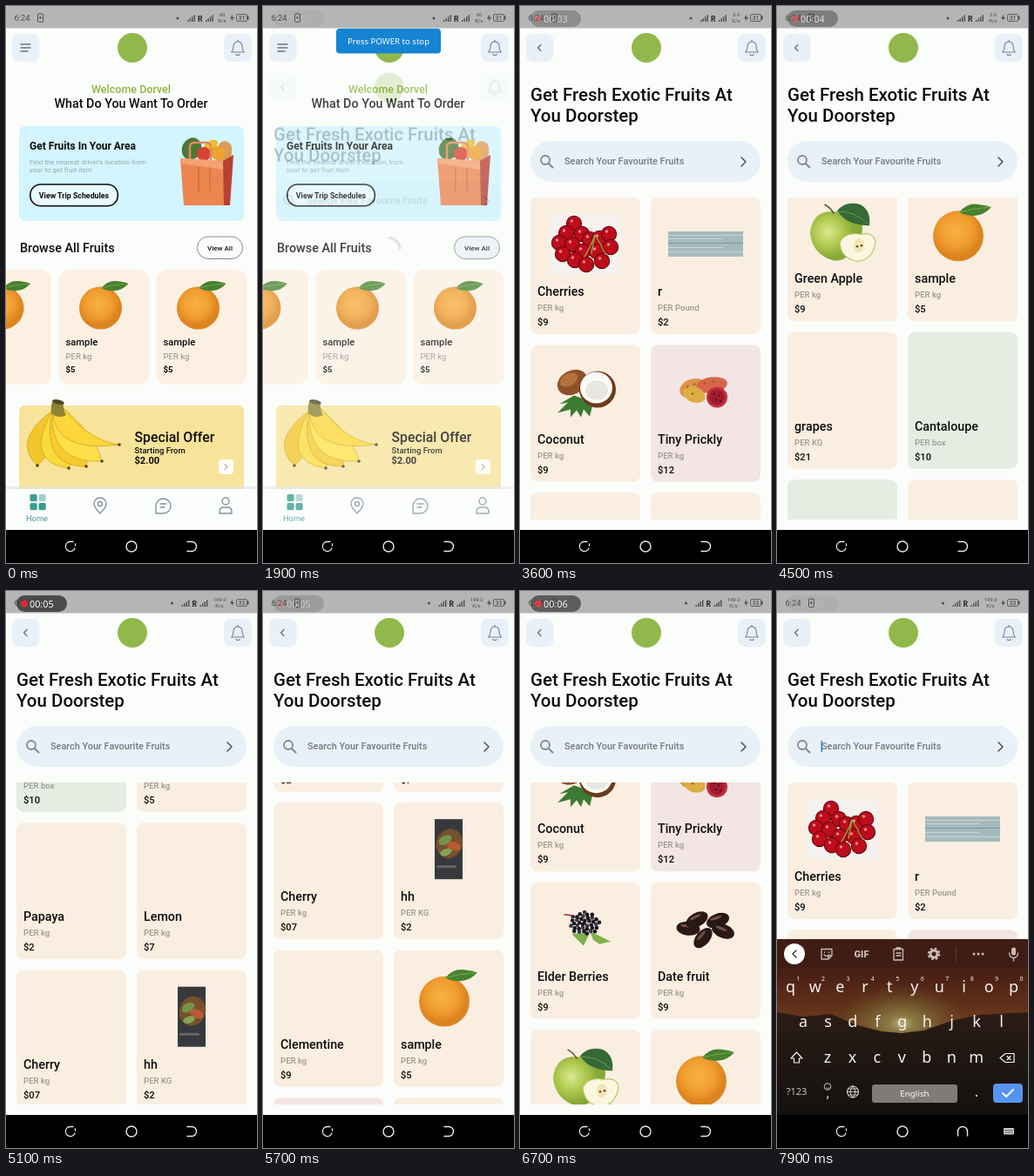
An HTML page for the animation above (8000 ms loop, 288 by 640 pixels).

```html
<!DOCTYPE html>
<html lang="en">
<head>
<meta charset="utf-8">
<title>Fruit shop</title>
<style>
html, body { margin: 0; width: 100%; height: 100%; overflow: hidden; background: #fbfdfb; }
svg { display: block; width: 100vw; height: 100vh; font-family: Roboto, sans-serif; }
.sys { font-family: "Noto Sans", sans-serif; }
</style>
</head>
<body>
<svg id="stage" viewBox="0 0 288 640" xmlns="http://www.w3.org/2000/svg"></svg>
<script>
const LOOP = 8000, BG = '#fbfdfb', ICE = '#e8f1f8', INK = '#0d0d0d';

// Markup helpers
const rect = (x, y, w, h, r, fill, more = '') =>
  `<rect x="${x}" y="${y}" width="${w}" height="${h}" rx="${r}" fill="${fill}" ${more}/>`;
const circle = (x, y, r, fill, more = '') =>
  `<circle cx="${x}" cy="${y}" r="${r}" fill="${fill}" ${more}/>`;
const oval = (x, y, rx, ry, turn, fill) =>
  `<ellipse rx="${rx}" ry="${ry}" fill="${fill}" transform="translate(${x} ${y}) rotate(${turn})"/>`;
const shape = (d, fill, more = '') => `<path d="${d}" fill="${fill}" ${more}/>`;
const line = (d, color, w = 1.4) =>
  `<path d="${d}" fill="none" stroke="${color}" stroke-width="${w}" stroke-linecap="round" stroke-linejoin="round"/>`;
const text = (x, y, s, size, weight = 500, fill = INK, more = '') =>
  `<text x="${x}" y="${y}" font-size="${size}" font-weight="${weight}" fill="${fill}" ${more}>${s}</text>`;
const mid = (x, y, s, size, weight, fill, more = '') =>
  text(x, y, s, size, weight, fill, `text-anchor="middle" ${more}`);
const group = (x, y, body, scale = 1) =>
  `<g transform="translate(${x} ${y}) scale(${scale})">${body}</g>`;
const dots = (pts, r, fill) => pts.map(([x, y]) => circle(x, y, r, fill)).join('');

// Fruit, each drawn relative to its card
const orange =
  circle(0, 0, 24.5, 'url(#orange)') +
  shape('M1-23Q8-32 18-31T32-28Q26-21 17-20T1-23Z', '#47822f') +
  line('M1-23Q14-27 30-28', '#86ad55', .7);

const cherryPts = [[50, 30], [41, 41], [59, 42], [33, 52], [68, 48], [48, 54], [79, 47], [90, 42],
  [92, 57], [37, 65], [60, 62], [51, 72], [76, 62], [64, 77], [82, 73]];
const pictures = {
  cherries: rect(21, 19, 83, 70, 0, '#f4f1ee') +
    cherryPts.map(([x, y]) => circle(x, y, 8.6, '#bd0d1b', 'stroke="#6d0711" stroke-width="1.2"') +
      circle(x - 2.5, y - 3, 1.7, '#f08a90')).join('') +
    line('M74 43Q70 55 62 68M74 43Q80 52 85 63M74 43L70 64', '#8fae3a', 1.3),
  strip: rect(20, 39, 86, 29, 0, '#a6babd') +
    [43, 47, 52, 57, 62].map((y, i) => rect(20, y, 86 - i % 2 * 24, 1, 0, i == 2 ? '#6f9cb2' : '#c9d5d4')).join(''),
  coconut: shape('M31 78L43 66L33 68L50 58L72 66L68 82L61 74L58 83L53 75L46 83L46 74Z', '#3b7a31') +
    oval(48, 43, 18, 13.5, -28, '#8f512a') + oval(44, 40, 11, 7, -28, '#b4713d') +
    circle(77, 51, 21, '#6b3c1e') + oval(75.5, 49, 18.5, 18, 0, '#fbfaf6') + oval(76, 52, 13, 11, 0, '#e8e6e0'),
  prickly: oval(49, 50, 16, 11, -15, '#e0924a') + oval(70, 46, 18, 9, -8, '#d8654a') +
    oval(50, 57, 13, 9, 20, '#dcae45') + dots([[42, 48], [50, 45], [48, 56], [62, 44], [72, 42]], 1.3, '#8b6a25') +
    oval(76, 60, 12, 12, 15, '#c0303a') + oval(76, 60, 9, 9, 15, '#a01c30') +
    dots([[73, 56], [78, 58], [75, 63], [80, 64]], 1, '#4a0a14'),
  elder: shape('M47 59L68 58L61 73ZM68 56L92 68L79 71L72 66Z', '#7fb04c') +
    line('M39 37Q52 38 60 44', '#963040', 1.5) +
    Array.from({ length: 38 }, (_, i) => {
      const a = i * 2.4, d = Math.sqrt(i / 38);
      return circle(62 + 18 * d * Math.cos(a), 47 + 13 * d * Math.sin(a), 2.3, i % 3 ? '#17151d' : '#3b3545');
    }).join(''),
  dates: [[43, 53, 5], [53, 43, -28], [77, 44, -20], [83, 56, 22], [60, 64, -50]]
    .map(([x, y, a]) => oval(x, y, 13.5, 8, a, '#2a1814') + oval(x - 2, y - 3, 7, 1.6, a, '#74524a')).join(''),
  apple: shape('M56 31Q70 23 80 33Q92 48 80 70Q66 92 49 86Q28 78 26 55Q29 28 56 31Z', 'url(#apple)') +
    line('M53 33Q50 27 43 23', '#69502d', 1.5) +
    shape('M57 30Q67 18 84 23Q96 30 94 47Q68 47 57 30Z', '#356a37') + line('M58 31Q77 30 92 45', '#83a96f', .7) +
    shape('M60 66Q66 54 84 57Q99 54 101 66Q98 87 80 88Q61 85 60 66Z', '#fbf6df', 'stroke="#b7c869" stroke-width="1.2"') +
    oval(82, 70, 6, 8, 0, '#f0e5b6') + dots([[80, 71], [85, 70]], 1.3, '#6b4424'),
  orange: group(58, 59, orange, 1.18),
  plate: rect(47, 19, 32, 69, 0, '#37393c') + oval(64, 47, 15, 17, 20, '#77512d') +
    oval(59, 43, 8, 5, -30, '#739347') + oval(69, 50, 8, 5, 20, '#b75a36') +
    oval(60, 57, 7, 4, -20, '#83a352') + rect(49, 72, 23, 3, 1, '#626668'),
  none: ''
};

// Home screen
const bell = group(266, 48,
  line('M-6.5 4.5Q-4.5 2-4.5-2A4.5 4.5 0 0 1 4.5-2Q4.5 2 6.5 4.5ZM-2 7Q0 8.5 2 7M0-8V-6.6', '#76808b', 1), 1.1);
const header = icon =>
  rect(7, 32, 31.5, 32, 8, ICE) + rect(250, 32, 32, 32, 8, ICE) + bell + icon + circle(145, 48, 17, '#91b84a');

const homeCard = x => rect(x, 303, 104, 132, 12, '#fcf0e3') + group(x + 48, 347, orange) +
  text(x + 8, 390, 'sample', 11.2) + text(x + 8, 406, 'PER kg', 9.6, 400, '#8f8a84') +
  text(x + 8, 421, '$5', 9.6, 700);

const bag = shape('M243 163Q246 153 254 156Q262 159 258 174L255 190H240Z', '#dc9a54') +
  oval(213, 164, 11, 13, 25, '#4e7636') + oval(235, 160, 9, 5, -30, '#f2bb2c') +
  circle(227, 170, 8, '#d64231') + circle(243, 169, 8, '#efa22e') +
  line('M211 182V161Q212 157 216 157H230Q234 157 235 161V181', '#d98a5f', 2.5) +
  shape('M200 175L249 178L252 229H204Z', '#ed8550') + shape('M249 178L261 171L257 229H250Z', '#b94035') +
  shape('M200 175L249 178L249 188L202 181Z', '#f4a271') + line('M221 186V212M234 186V212', '#d56a3d', 1.5);

// Outer bend, tip, inner bend
const banana = (ox, oy, tx, ty, ix, iy, fill) =>
  shape(`M53 465Q${ox} ${oy} ${tx} ${ty}Q${ix} ${iy} 67 463Z`, fill, 'stroke="#d3a51d" stroke-width=".8"') +
  circle(tx, ty, 1.8, '#4f3f1e');
const bananas =
  banana(6, 500, 36, 528, 66, 500, '#f2c62d') + banana(20, 524, 72, 531, 86, 510, '#fbda3e') +
  banana(40, 530, 92, 529, 98, 504, '#f5cb2e') + banana(50, 526, 110, 523, 104, 496, '#ffe04b') +
  banana(56, 514, 130, 504, 96, 500, '#fbd73a') +
  shape('M52 468Q51 457 54 453L66 456Q65 463 69 470Q60 475 52 468Z', '#8b8234') + oval(60, 455, 7, 2.6, 12, '#4f4722');

const GREY = '#8793a2';
const tabs = rect(0, 552, 288, 4, 0, '#dfe4e3', 'opacity=".6"') + rect(0, 555, 288, 47, 0, '#fcfefd') +
  [[27.5, 561], [37.5, 561], [27.5, 571], [37.5, 571]].map(([x, y], i) =>
    rect(x, y, 8.2, 8.2, 1.8, i == 1 ? '#a9cdca' : '#3a9c8f')).join('') +
  mid(35.5, 592, 'Home', 9.3, 400, '#4a939b') +
  line('M108 583Q101 576 101 572A7 7 0 0 1 115 572Q115 576 108 583ZM105.5 572A2.5 2.5 0 1 0 110.5 572A2.5 2.5 0 1 0 105.5 572', GREY) +
  line('M172 583V574A8.5 8.5 0 1 1 180.5 583ZM177 572H184M177 576H182', GREY) +
  circle(252, 569, 4, 'none', `stroke="${GREY}" stroke-width="1.4"`) +
  line('M245 583V581Q245 576 250 576H254Q259 576 259 581V583Z', GREY);

const home = rect(0, 25, 288, 577, 0, BG) +
  header(line('M17 44H28M17 48H28M17 52H25', '#69737f', 1.3)) +
  mid(143.5, 100, 'Welcome Dorvel', 12.5, 500, '#8cb33e') +
  mid(143.5, 117, 'What Do You Want To Order', 14.3) +
  rect(15, 138, 258, 109, 7, '#d2f5fe') +
  text(27, 165, 'Get Fruits In Your Area', 12, 700) +
  text(27, 182, "Find the nearest driver's location from", 8, 400, '#98a6aa') +
  text(27, 191, 'your to get fruit item', 8, 400, '#98a6aa') +
  rect(27.8, 205, 100.5, 24.8, 12, '#e9fafe', `stroke="${INK}" stroke-width="1.6"`) +
  mid(78, 220.5, 'View Trip Schedules', 8.8, 700) + bag +
  text(16, 283, 'Browse All Fruits', 14.4) +
  rect(219.5, 265, 52, 25.5, 12.7, BG, 'id="viewAll" stroke="#777d80" stroke-width=".9"') +
  mid(245.5, 280.5, 'View All', 8) +
  homeCard(-52) + homeCard(60.5) + homeCard(172.5) +
  rect(15, 459, 258, 110, 6, '#f8e39b') + bananas +
  text(147.5, 501, 'Special Offer', 15.8) + text(147.5, 513.5, 'Starting From', 9.5) +
  text(147.5, 526, '$2.00', 11.1, 700) +
  rect(244, 521, 17, 17, 4, '#fdfcf8') + line('M251 526.5L254 529.5L251 532.5', '#777', 1) + tabs;

// Shop list
const tints = { b: '#f9eee0', p: '#f3e5e4', g: '#e5ede2' };
const goods = [
  'Cherries|PER kg|$9|b|cherries', 'r|PER Pound|$2|b|strip',
  'Coconut|PER kg|$9|b|coconut', 'Tiny Prickly|PER kg|$12|p|prickly',
  'Elder Berries|PER kg|$9|b|elder', 'Date fruit|PER kg|$9|b|dates',
  'Green Apple|PER kg|$9|b|apple', 'sample|PER kg|$5|b|orange',
  'grapes|PER KG|$21|b|none', 'Cantaloupe|PER box|$10|g|none',
  'Guava|PER box|$10|g|none', 'Kiwi|PER kg|$5|b|none',
  'Papaya|PER kg|$2|b|none', 'Lemon|PER kg|$7|b|none',
  'Cherry|PER kg|$07|b|none', 'hh|PER KG|$2|b|plate',
  'Clementine|PER kg|$9|b|none', 'sample|PER kg|$5|b|orange',
  'Plum|PER kg|$9|p|none', 'Mango|PER kg|$5|b|none'];
const cards = goods.map((row, i) => {
  const [name, unit, price, tint, pic] = row.split('|');
  return group(i % 2 ? 150 : 12, 220 + (i >> 1) * 169.5,
    rect(0, 0, 126, 157, 8, tints[tint]) + pictures[pic] + text(8, 113, name, 14.3) +
    text(8, 130, unit, 9.6, 500, '#9c9893') + text(8, 147, price, 11.2));
}).join('');

const shop = rect(0, 25, 288, 577, 0, BG) +
  header(line('M24 44.5L20.5 48L24 51.5', '#5f6a76', 1.2)) +
  text(12, 109, 'Get Fresh Exotic Fruits At', 20.5) + text(12, 133, 'You Doorstep', 20.5) +
  rect(12, 155, 264, 47, 23.5, ICE) +
  circle(29, 177, 5, 'none', 'stroke="#85888a" stroke-width="1.8"') + line('M32.8 181L37.5 185.5', '#85888a', 2) +
  text(51, 182, 'Search Your Favourite Fruits', 10.9, 500, '#75797d') +
  line('M254 174L259 179L254 184', '#4b5157', 1.5) +
  rect(50.5, 172, 1.5, 13, 0, '#2a8ad8', 'id="caret"') +
  `<path id="spinner" d="M0-13A13 13 0 0 1 13 0" fill="none" stroke="#7f8c72" stroke-width="3"/>` +
  `<g id="list" clip-path="url(#listClip)"><g id="scroll">${cards}</g></g>`;

// Keyboard
const KEY = '#f4f1ee', SOFT = '#c9bdb6';
const keyRow = (keys, x, y) => [...keys].map((k, i) =>
  mid(x + i * 28.45, y, k, 18, 400, KEY, 'class="sys"')).join('');
const keyboard = rect(0, 400, 288, 202, 0, 'url(#dusk)') +
  `<ellipse cx="143" cy="497" rx="75" ry="45" fill="url(#sun)"/>` +
  shape('M0 484L30 489L62 486L92 499L120 506L143 508L168 505L200 494L232 487L288 484V602H0Z', 'url(#hills)') +
  rect(0, 400, 288, 34, 0, '#3f1d15') +
  circle(20, 417, 12, '#fff') + line('M22 413L18 417L22 421', '#333') +
  line('M51 411.5H63V419L59 423H51ZM63 419H59V423M54 418Q57 421 60 418M54.5 415V415.5M59.5 415V415.5', SOFT, 1.3) +
  mid(97, 421, 'GIF', 11, 800, SOFT) +
  line('M134 411.5H144.5V424H134ZM137 411.5V410H141.5V411.5M137 416H142M137 419H142', SOFT, 1.3) +
  circle(180, 417, 4, 'none', `stroke="${SOFT}" stroke-width="3"`) +
  circle(180, 417, 6.3, 'none', `stroke="${SOFT}" stroke-width="2" stroke-dasharray="2.6 2.35"`) +
  rect(205, 409, 1, 17, 0, '#5d3a32') + dots([[226, 417], [231, 417], [236, 417]], 1.5, SOFT) +
  rect(269, 409.5, 5, 9, 2.5, SOFT) + line('M266.5 416Q267 421.5 271.5 421.5T276.5 416M271.5 422V425', SOFT, 1.3) +
  keyRow('qwertyuiop', 15.5, 461) + keyRow('asdfghjkl', 30, 501) + keyRow('zxcvbnm', 58, 542) +
  [...'1234567890'].map((n, i) => mid(24.5 + i * 28.45, 448, n, 7, 400, KEY, 'class="sys"')).join('') +
  line('M22.5 530L29 537H25.5V542H19.5V537H16Z', KEY, 1.2) +
  line('M262 531.5H272V541.5H262L256 536.5ZM264 534.5L268 538.5M268 534.5L264 538.5', KEY, 1.2) +
  mid(22.5, 579, '?123', 11, 400, '#c9c5c0', 'class="sys"') +
  circle(58, 569.5, 3.8, 'none', `stroke="${KEY}" stroke-width=".8"`) + line('M56.5 571Q58 572.5 59.5 571', KEY, .7) +
  mid(58.5, 582, ',', 14, 400, KEY, 'class="sys"') +
  circle(87, 575.5, 6.5, 'none', `stroke="${KEY}"`) +
  line('M80.5 575.5H93.5M87 569Q81 575.5 87 582Q93 575.5 87 569M82 572H92M82 579H92', KEY, .8) +
  rect(109, 567, 98, 21, 3, '#807b78') +
  mid(158, 581, 'English', 9.8, 400, '#fff', 'class="sys"') + mid(229, 581, '.', 16, 400, KEY, 'class="sys"') +
  rect(248, 566, 34, 22, 4, '#5794f2') + line('M259 577L263 581L271 573', '#fff', 1.8);

// System chrome
const DIM = '#4c4f4e';
const bars = x => [0, 1, 2, 3].map(i => rect(x + i * 2.5, 16 - i * 1.9, 1.4, 2 + i * 1.9, 0, DIM)).join('');
const status = rect(0, 0, 288, 25.5, 0, '#b4b6b5') +
  text(9.5, 17, '6:24', 9.4, 400, DIM) +
  rect(36.5, 9, 6, 9.5, 1, 'none', `stroke="${DIM}"`) + circle(39.5, 13.5, 1.2, DIM) +
  `<g id="signal">${circle(197, 14, 1.5, DIM) + bars(208) +
    text(220, 17.5, 'R', 8.5, 800, '#333') + bars(229)}</g>` +
  mid(248, 12, '', 6, 400, DIM, 'id="speed"') + mid(248, 18.5, '', 6, 400, DIM, 'id="unit"') +
  shape('M260 9.5L257 14.5H259.5L258.5 18L262 12.8H259.5Z', DIM) +
  rect(264.5, 9.5, 12, 8, 1.5, 'none', `stroke="${DIM}" stroke-width=".8"`) + rect(277, 11.5, 1.5, 4, 0, DIM) +
  mid(270.5, 16, '', 6.5, 500, DIM, 'id="battery"');

const pill = rect(12, 5, 58, 19, 9.5, '#3b3b3b', 'opacity=".9"') + circle(21, 14.5, 4, '#e0262d') +
  text(27, 18.5, '', 10.8, 400, '#fff', 'id="clock" class="sys"');

const navBar = rect(0, 602, 288, 38, 0, '#000') +
  line('M77 615.5H74A5.5 5.5 0 1 0 79 623M79.5 618V620', '#e9e9e9', 1.3) +
  circle(144, 621, 6, 'none', 'stroke="#e9e9e9" stroke-width="1.4"') +
  `<g id="back">${line('M-5-5.5H0A5.5 5.5 0 0 1 0 5.5H-5', '#e9e9e9')}</g>` +
  `<g id="keysIcon">${rect(260, 617, 12, 7.5, 1, '#c9c9c9')}
    <path d="M261.5 619.500H271M261.5 622H271" stroke="#000" stroke-dasharray="1 1"/></g>`;

const fade = (tag, id, stops, more = '') => `<${tag} id="${id}" ${more}>` + stops.map(([o, c, a = 1]) =>
  `<stop offset="${o}" stop-color="${c}" stop-opacity="${a}"/>`).join('') + `</${tag}>`;
const down = 'x2="0" y2="1"';

stage.innerHTML = '<defs>' +
  fade('radialGradient', 'orange', [[0, '#f8b244'], [.65, '#f09c2e'], [1, '#dc8420']], 'cx=".45" cy=".4"') +
  fade('radialGradient', 'apple', [[0, '#dbe890'], [.5, '#b3cc52'], [1, '#86a836']], 'cx=".35" cy=".45"') +
  fade('linearGradient', 'dusk', [[0, '#3f1d15'], [.2, '#4a2015'], [.35, '#5c2d18'], [.5, '#6e4020'], [1, '#2a1a12']], down) +
  fade('linearGradient', 'hills', [[0, '#2c1d14'], [.35, '#211812'], [1, '#15110f']], down) +
  fade('radialGradient', 'sun', [[0, '#b9b27a'], [.2, '#8f8048', .9], [1, '#6e5a28', 0]]) +
  `<clipPath id="screen"><rect y="25" width="288" height="577"/></clipPath>
   <clipPath id="listClip"><rect y="220" width="288" height="370"/></clipPath></defs>` +
  `<g clip-path="url(#screen)">${home}<g id="shop">${shop}</g><g id="keyboard">${keyboard}</g></g>` +
  status + `<g id="pill">${pill}</g>` +
  `<g id="toast">${rect(84, 26, 120, 28.5, 4, '#1584d2') +
    mid(144, 44, 'Press POWER to stop', 9.6, 400, '#fff', 'class="sys"')}</g>` + navBar;

// Motion: [time, value] steps, linear between
const tracks = {
  shopY: [[1770, 160], [1830, 115], [1900, 46], [1950, 20], [2000, 7], [2070, 0]],
  shopFade: [[1770, 0], [1830, .07], [1900, .22], [1980, .6], [2070, 1]],
  toast: [[250, 0], [500, 1], [2450, 1], [2700, 0]],
  scroll: [[3650, 0], [3800, 60], [4000, 260], [4200, 420], [4350, 490], [4500, 523], [4650, 560],
    [4800, 680], [5000, 890], [5200, 1050], [5450, 1140], [5700, 1163.5], [5850, 1140], [6000, 1010],
    [6250, 670], [6500, 365], [6700, 225], [6850, 120], [7050, 0]],
  list: [[2850, 0], [2950, 1]],
  keys: [[7500, 202], [7560, 150], [7630, 60], [7700, 15], [7780, 0]]
};
function at(name, t) {
  const steps = tracks[name], i = steps.findIndex(s => s[0] > t);
  if (i < 0) return steps[steps.length - 1][1];
  if (!i) return steps[0][1];
  const [t0, a] = steps[i - 1], [t1, b] = steps[i];
  return a + (b - a) * (t - t0) / (t1 - t0);
}

const el = id => document.getElementById(id);
const set = (id, attr, value) => el(id).setAttribute(attr, value);
const move = (id, x, y, more = '') => set(id, 'transform', `translate(${x} ${y}) ${more}`);
const say = (id, s) => { if (el(id).textContent !== s) el(id).textContent = s; };

function draw(t) {
  move('shop', 0, at('shopY', t));
  set('shop', 'opacity', at('shopFade', t));
  set('viewAll', 'fill', t >= 1850 ? ICE : BG);
  set('toast', 'opacity', at('toast', t));
  move('scroll', 0, -at('scroll', t));
  set('list', 'opacity', at('list', t));
  move('spinner', 144, 234, `rotate(${(t - 1900) * .4})`);
  set('spinner', 'opacity', t < 2850 ? 1 : 0);
  move('keyboard', 0, at('keys', t));
  set('caret', 'opacity', t >= 7450 ? 1 : 0);

  const typing = t >= 7500;
  move('back', 213, 621, typing ? 'rotate(-90)' : '');
  set('keysIcon', 'opacity', typing ? 1 : 0);

  // The recorder badge breathes every two seconds
  set('pill', 'opacity', t < 100 ? 0 : .03 + .48 * (1 - Math.cos(t * Math.PI / 1000)));
  say('clock', '00:0' + Math.floor(t / 1000));

  const wide = t >= 5000;
  move('signal', wide ? -6.5 : t >= 1000 ? -1 : 0, 0);
  set('speed', 'x', wide ? 245 : 248);
  set('unit', 'x', wide ? 245 : 248);
  say('speed', wide ? '149.0' : t >= 2500 ? '3.0' : '60');
  say('unit', t >= 2500 ? 'K/s' : 'B/s');
  say('battery', wide ? '33' : '31');
}

function frame() {
  draw(performance.now() % LOOP);
  requestAnimationFrame(frame);
}
frame();
</script>
</body>
</html>
```
